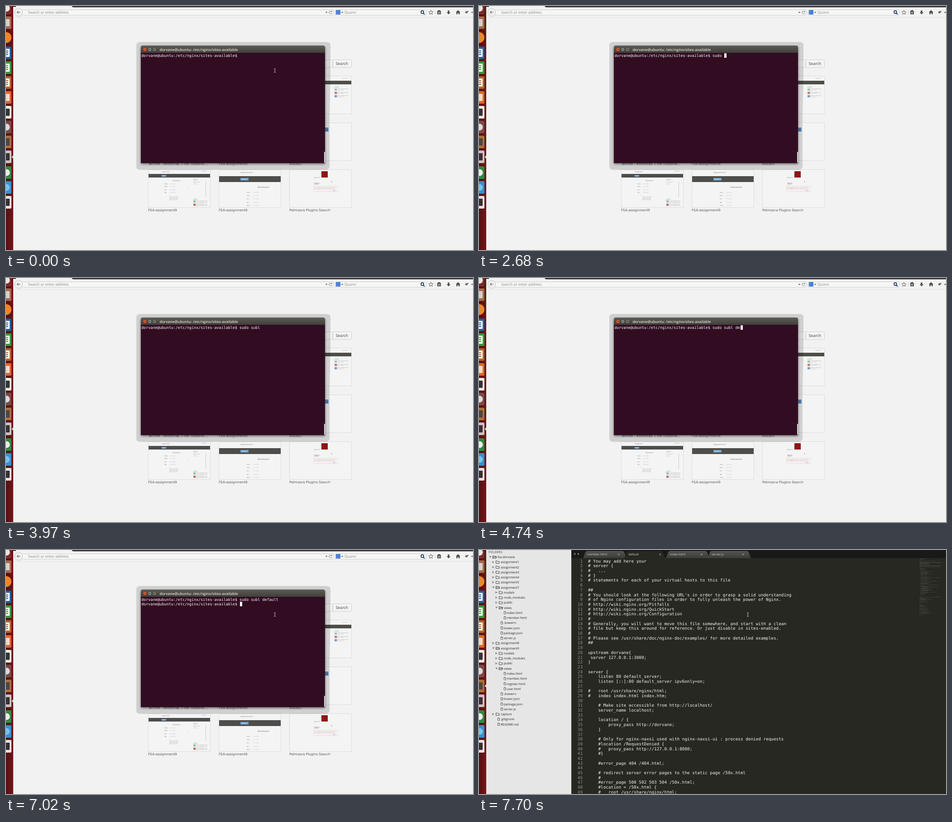
Recreate the animation shown at these times as an HTML page. Size 1032 by 542 pixels, loop 8000 ms.

```html
<!DOCTYPE html>
<html lang="en">
<head>
<meta charset="utf-8">
<title>Opening a config file</title>
<style>
  html, body { margin: 0; width: 100%; height: 100%; overflow: hidden; background: #f2f2f2; }
  svg { display: block; }
  text { font-family: "Open Sans", "Noto Sans", sans-serif; white-space: pre; text-rendering: geometricPrecision; }
  .mono { font-family: "DejaVu Sans Mono", monospace; }
  .wide { font-family: "DejaVu Sans", sans-serif; }
  .semi { font-weight: 600; }
  .bold { font-weight: 700; }
</style>
</head>
<body>
<svg id="stage" width="1032" height="542" viewBox="0 0 1032 542">
  <defs>
    <linearGradient id="dock"><stop offset="0" stop-color="#561013"/><stop offset=".8" stop-color="#6d1417"/><stop offset="1" stop-color="#7e1c1e"/></linearGradient>
    <linearGradient id="title" x2="0" y2="1"><stop offset="0" stop-color="#5d5b55"/><stop offset="1" stop-color="#403f3a"/></linearGradient>
    <linearGradient id="tab" x2="0" y2="1"><stop offset="0" stop-color="#53544f"/><stop offset="1" stop-color="#3b3c37"/></linearGradient>
    <filter id="shadow" x="-10%" y="-10%" width="120%" height="125%"><feDropShadow dx="0" dy="2" stdDeviation="2.5" flood-opacity=".55"/></filter>
  </defs>
  <g id="browser"></g>
  <g id="editor"></g>
  <g id="launcher"></g>
  <g id="pointer" fill="none" stroke="#e4dfe2" stroke-width=".9"><path d="M592.3 139.5h1.2l.6.6.6-.6h1.2M594.1 140v7M592.3 147.5h1.2l.6-.6.6.6h1.2"/></g>
</svg>
<script>
const LOOP = 8000;
const USER = 'dorvane';
const PROMPT = USER + '@ubuntu:/etc/nginx/sites-available$ ';
const COMMAND = 'sudo subl default';
const CELL = 5.057;

const $ = id => document.getElementById(id);
const rect = (x, y, w, h, fill, more = '') => `<rect x="${x}" y="${y}" width="${w}" height="${h}" fill="${fill}" ${more}/>`;
const disc = (x, y, r, fill, more = '') => `<circle cx="${x}" cy="${y}" r="${r}" fill="${fill}" ${more}/>`;
const path = (d, fill, more = '') => `<path d="${d}" fill="${fill}" ${more}/>`;
const line = (d, color, width = 1) => path(d, 'none', `stroke="${color}" stroke-width="${width}"`);
const text = (x, y, s, size, fill, more = '') => `<text x="${x}" y="${y}" font-size="${size}" fill="${fill}" ${more}>${s}</text>`;
const tiny = (x, y, s, fill = '#888', size = 2.6) => text(x, y, s, size, fill);
const box = (x, y, w, h, fill, stroke, r = 0) => rect(x + .5, y + .5, w - 1, h - 1, fill, `stroke="${stroke}" rx="${r}"`);

// ---- Browser ----
function toolbar() {
  const ink = '#4a4a4a';
  return rect(16, 0, 1016, 542, '#f2f2f2') +
    path('M145 0H1032V3H150Q146 3 145 0Z', '#3c3b37') + rect(16, 0, 6, 2, '#3c3b37') +
    rect(16, 25, 1016, 1, '#e2e1e0') +
    box(34, 8, 690, 13, '#f6f6f6', '#cfcecd', 2) +
    disc(28, 14, 8.5, '#f4f4f4', 'stroke="#bcbbba"') +
    line('M32 14H24.5M28 10.5L24.3 14L28 17.5', '#8b8a89', 1.5) +
    text(49, 17.3, 'Search or enter address', 8.05, '#858585') +
    path('M705.5 13h5l-2.5 3z', '#666') +
    line('M719.4 12.6A3 3 0 1 0 719.8 15', '#777') + path('M717.5 13.4h3v-3z', '#777') +
    box(727, 8, 202, 13, '#f6f6f6', '#cfcecd', 2) +
    rect(729, 9, 10, 10, '#4b80d6') + path('M740.5 13h5l-2.5 3z', '#666') +
    text(748, 17.3, 'Quorvi', 8.05, '#858585') +
    disc(920, 13.5, 3, 'none', 'stroke="#25406f" stroke-width="1.8"') + line('M922 15.7L925 18.7', '#25406f', 2) +
    path('M939 9.5l1.4 3.1 3.3.3-2.5 2.3.8 3.3-3-1.8-3 1.8.8-3.3-2.5-2.3 3.3-.3z', 'none', `stroke="${ink}" stroke-width=".9"`) +
    rect(948, 10, 1, 9, '#d4d3d2') +
    rect(953, 10.5, 8, 8, ink, 'rx="1"') + rect(955, 9.3, 4, 2, ink) + line('M954.5 13.5h5M954.5 16h5M957 13v4', '#eee', .8) +
    path('M976.3 10h3.4v4h2.5l-4.2 4.5-4.2-4.5h2.5z', ink) +
    path('M999 9.3l5 4.7h-1.4v4.4h-2.4v-3h-2.4v3h-2.4V14H994z', ink) +
    path('M1015 12.5l7-2-1 3-3 3-3-1z', '#666') + path('M1027.500 13h5l-2.500 3z', '#666');
}

function posts(x, y, step) {
  return ['#8fc7b0', '#c06a62', '#6b8fc0'].map((c, i) => {
    const top = y + i * step;
    return rect(x, top, 5.5, 5, c, 'opacity=".85"') + tiny(x + 6.5, top + 2.1, 'Short headline here') + tiny(x + 6.5, top + 4.6, 'Read more', '#aaa');
  }).join('');
}

function fields(x, y, step, gap, names) {
  return names.map((n, i) => tiny(x, y + i * step, n, '#555') + tiny(x + gap, y + i * step, 'Your value', '#aaa')).join('');
}

function page() {
  const cols = [314, 470, 626], rows = [155, 259, 363];
  const caption = (x, y, s) => text(x, y, s, 7.35, '#555', 'class="wide"');
  let out = box(560, 119, 162, 18, '#f5f5f5', '#d5d5d5') + box(722, 119, 42, 18, '#f4f4f4', '#d0d0d0', 1) +
    text(728.5, 131.2, 'Search', 8.8, '#3a3a3a');
  for (const y of rows) for (const x of cols) out += box(x, y, 138, 85, '#f4f4f4', '#dcdcdc');
  out += rect(627, 166, 136, 8, '#4d4d4a') + tiny(743, 162, 'Home') + tiny(751, 162, 'Out') +
    tiny(726, 180.500, 'RECENT', '#666') + posts(726, 183, 7.5) +
    rect(700, 270, 12.500, 9, '#5b8fc9') + tiny(706, 276, 'Add', '#234');
  out += caption(314, 352.600, 'Tarvine - Bootstrap 3 flat corporat...') + caption(470, 352.600, 'FSA-assignment9') + caption(626, 352.600, 'ADDED');

  out += tiny(344, 368.600, 'Assignment', '#667', 3.2) + tiny(432, 368, 'Home') + tiny(438.500, 368, 'Out') +
    rect(315, 373, 136, 8, '#4d4d4a') + rect(344, 375.500, 10, 3.500, '#78a6d2') + tiny(345, 378, 'Register', '#fff', 2) +
    tiny(368, 389, 'REGISTRATION', '#555', 2.500) + fields(350, 396, 6.300, 12, ['Name', 'Email', 'City', 'Age']) +
    tiny(401, 405, 'ok', '#aaa') + tiny(414, 387.300, 'SEARCH', '#666') + tiny(414, 392, 'Type a word') + tiny(414, 396, 'Results', '#aaa') +
    tiny(361, 425, 'Terms and notes') + tiny(361, 428, 'Read these first') + tiny(361, 431, 'before sending') +
    rect(441, 390, 1, 34, '#ccc') + tiny(414, 429.500, 'RECENT', '#666') + rect(414, 431.500, 5.500, 5, '#8fc7b0') +
    rect(414, 439, 5.500, 5, '#b87b73') + [434, 436.500, 441, 443.500].map(y => tiny(421, y, 'Short headline here')).join('');

  out += tiny(518, 371.300, 'Assignment nine', '#5d7286', 3.500) + rect(471, 378, 136, 13, '#4d4d4a') + rect(518, 382, 18, 5.500, '#78a6d2') +
    tiny(521, 386, 'Register', '#fff', 3) + text(556, 403.800, 'REGISTRATION', 3.700, '#555') +
    fields(532, 415, 7.200, 14, ['Name', 'Email', 'City', 'Age', 'Phone']);

  out += rect(697, 367, 14, 14, '#8c1515') + tiny(680, 382, 'plugin list', '#777', 3) +
    text(681, 395.300, 'Search', 3.700, '#444') + line('M681 396.500h10', '#888', .5) + line('M719.500 388.500v3.500', '#666', .7) +
    box(679, 400, 54, 12, '#f5f3f3', '#e5dddd') +
    [403.500, 406.500].map(y => tiny(681, y, 'Find a plugin by its name or by a tag in the list', '#b56a6a', 2.200)).join('') +
    tiny(722, 410.500, 'more', '#a33');
  return out + caption(314, 456, 'FSA-assignment9') + caption(470, 456, 'FSA-assignment9') + caption(626, 456, 'Pelmoora Plugins Search');
}

function terminal() {
  const button = (x, fill, mark) => disc(x, 96.500, 4.200, fill, 'stroke="#33322e" stroke-width=".8"') + line(mark, '#3a3934', .9);
  return path('M296 80H709Q717 80 717 88V150L715 250V356Q714 364 706 364H296Q288 364 288 356V88Q288 80 296 80Z', '#000', 'opacity=".14"') +
    '<g filter="url(#shadow)">' + path('M298 349V93Q298 88 303 88H700Q705 88 705 93V349Z', '#300a24') + '</g>' +
    path('M298 104V93Q298 88 303 88H700Q705 88 705 93V104Z', 'url(#title)') +
    button(307, '#ea5a2c', 'M305.500 95l3 3m0-3l-3 3') + button(317.700, '#85837b', 'M315.700 96.500h4') + button(328.200, '#85837b', 'M326.700 95h3v3h-3z') +
    text(339.500, 99.800, USER + '@ubuntu: /etc/nginx/sites-available', 8.200, '#e3dfd6', 'class="semi"') +
    rect(703, 324, 2, 24, '#dedad7') +
    text(299.200, 113, '', 8.400, '#fff', 'class="mono" id="row1"') +
    text(299.200, 123, PROMPT, 8.400, '#fff', 'class="mono" id="row2"') +
    rect(0, 0, 5, 10, '#fff', 'id="caret"');
}

// ---- Editor ----
const CODE = `# You may add here your
# server {
#   ...
# }
# statements for each of your virtual hosts to this file

##
# You should look at the following URL's in order to grasp a solid understanding
# of Nginx configuration files in order to fully unleash the power of Nginx.
# http://wiki.nginx.org/Pitfalls
# http://wiki.nginx.org/QuickStart
# http://wiki.nginx.org/Configuration
#
# Generally, you will want to move this file somewhere, and start with a clean
# file but keep this around for reference. Or just disable in sites-enabled.
#
# Please see /usr/share/doc/nginx-doc/examples/ for more detailed examples.
##

upstream ${USER}{
 server 127.0.0.1:3000;
}

server {
    listen 80 default_server;
    listen [::]:80 default_server ipv6only=on;

#   root /usr/share/nginx/html;
#   index index.html index.htm;

    # Make site accessible from http://localhost/
    server_name localhost;

    location / {
        proxy_pass http://${USER};
    }

    # Only for nginx-naxsi used with nginx-naxsi-ui : process denied requests
    #location /RequestDenied {
    #   proxy_pass http://127.0.0.1:8080;
    #}

    #error_page 404 /404.html;

    # redirect server error pages to the static page /50x.html
    #
    #error_page 500 502 503 504 /50x.html;
    #location = /50x.html {
    #   root /usr/share/nginx/html;
    #}

    # pass the PHP scripts to FastCGI server listening on 127.0.0.1:9000
    #
    #location ~ \\.php$ {
    #   fastcgi_split_path_info ^(.+\\.php)(/.+)$;
    #   # NOTE: You should have "cgi.fix_pathinfo = 0;" in php.ini
    #
    #   # With php5-cgi alone:
    #   fastcgi_pass 127.0.0.1:9000;
    #   # With php5-fpm:
    #   fastcgi_pass unix:/var/run/php5-fpm.sock;
    #   fastcgi_index index.php;
    #   include fastcgi_params;
    #}

    # deny access to .htaccess files, if the document root
    # concurs with nginx's one
    #
    #location ~ /\\.ht {
    #   deny all;
    #}
}


# another virtual host using mix of IP-, name-, and port-based configuration
#
#server {
#   listen 8000;
#   listen somename:8080;
#   server_name somename alias another.alias;
#   root html;
#   index index.html index.htm;
#
#   location / {
#       try_files $uri $uri/ =404;
#   }
#}


# HTTPS server
#
#server {
#   listen 443;
#   server_name localhost;
#
#   root html;
#   index index.html index.htm;
#
#   ssl on;
#   ssl_certificate cert.pem;
#   ssl_certificate_key cert.key;
#
#   ssl_session_timeout 5m;
#
#   ssl_protocols SSLv3 TLSv1 TLSv1.1 TLSv1.2;
#   ssl_prefer_server_ciphers on;
#
#   location / {
#       try_files $uri $uri/ =404;
#   }
#}`.split('\n');

// Indent gives depth; "+" is a closed folder, "-" an open one.
const TREE = `-fsa-${USER}
 +assignment1
 +assignment2
 +assignment3
 +assignment4
 +assignment5
 -assignment7
  +models
  +node_modules
  +public
  -views
   index.html
   member.html
  .bowerrc
  bower.json
  package.json
  server.js
 +assignment8
 -assignment9
  +models
  +node_modules
  +public
  -views
   index.html
   member.html
   register.html
   user.html
  .bowerrc
  bower.json
  package.json
  server.js
 +capture
 .gitignore
 README.md`.split('\n');

function sidebar() {
  let out = rect(16, 0, 188, 542, '#e6e6e6') + text(21, 6.800, 'FOLDERS', 6.900, '#7c7c7c', 'class="bold"');
  TREE.forEach((row, i) => {
    const depth = row.search(/\S/), name = row.trim().replace(/^[+-]/, '');
    const x = 41 + depth * 6.900, y = 15.500 + i * 11.260, kind = row[depth];
    if (kind === '+' || kind === '-') {
      out += kind === '+' ? path(`M${x - 18.500} ${y - 2.600}l4.500 2.600-4.500 2.600z`, '#8a8a8a') : path(`M${x - 18.700} ${y - 2}h5.200l-2.600 4.200z`, '#8a8a8a');
      out += line(`M${x - 10.500} ${y + 2.800}v-5.300h2.800l1 1.100h3.500v4.200z`, '#333', .9);
      if (kind === '-') out += line(`M${x - 10.500} ${y + 2.800}l2-3h6.300l-1.500 3`, '#333', .8);
    } else {
      out += line(`M${x - 6.500} ${y - 2.900}h2.700l1.500 1.500v4.200h-4.200zM${x - 4} ${y - 2.900}v1.700h1.700`, '#444', .8);
    }
    out += text(x, y + 2.500, name, 6.850, '#222');
  });
  return out;
}

function tab(x, name, fill, id) {
  return `<g ${id ? `id="${id}"` : ''}>` + path(`M${x} 18.500C${x + 5} 18 ${x + 4} 2.500 ${x + 10} 2.500H${x + 88}C${x + 94} 2.500 ${x + 93} 18 ${x + 98} 18.500Z`, fill, 'stroke="#6a6b65" stroke-width=".5"') +
    label(x, name) + '</g>';
}

function label(x, name) {
  return text(x + 10, 12, name, 6.850, '#d2d2cc') + line(`M${x + 78} 8.200l3.400 3.400m0-3.400l-3.400 3.400`, '#b4b4ae', 1);
}

function editor() {
  const pitch = 10.690;
  const row = (s, i) => text(241, 27.700 + i * pitch, s, 9.345, '#f4f4ee', 'class="mono"');
  const number = (s, i) => text(229, 27.700 + i * pitch, i + 1, 9.345, '#8f908a', 'class="mono" text-anchor="end"');
  return rect(204, 0, 828, 542, '#272822') + rect(204, 0, 828, 18, '#191a17') + sidebar() +
    path('M213 6.200v5l-4-2.500z', '#85867f') + path('M218 6.200v5l4-2.500z', '#85867f') +
    tab(229, 'member.html', 'url(#tab)') +
    '<g id="moved">' + tab(504, 'server.js', 'url(#tab)') + tab(412, 'index.html', 'url(#tab)') + '</g>' +
    path('M319 19C324 18 324 2.500 330 2.500H403C409 2.500 408 18 414 19Z', '#272822', 'id="active"') +
    '<g id="activeLabel">' + label(320.500, 'default') + '</g>' +
    rect(204, 18, 828, 2, '#272822') +
    CODE.slice(0, 49).map(number).join('') +
    '<g id="code">' + CODE.map(row).join('') + '</g>' +
    '<use href="#code" opacity=".7" transform="translate(974 19) scale(.107) translate(-241 -19)"/>' +
    rect(240, 19, 1, 11, '#f8f8f0', 'id="bar"');
}

// ---- Launcher: centre y, tile colour, mark, mark colour ----
const ICONS = [
  [5, '#7c2c2b', 'disc', '#ebe5e0'], [37, '#a4684a', 'square', '#d5d0c9'], [70, '#6d1417', 'ball', '#e8872c'],
  [104, '#1e639b', 'page', '#fff'], [137, '#379a3c', 'page', '#fff'], [170, '#b4632f', 'page', '#fff'],
  [203, '#e2622b', 'square', '#f3d9ca'], [236, '#efebe6', 'square', '#333'], [269, '#7b4a48', 'disc', '#dedbd8'],
  [302, '#a9713a', 'square', '#4a4744'], [335, '#c9c3bf', 'square', '#3a3036'], [370, '#2f8c40', 'disc', '#eee'],
  [403, '#3692c9', 'disc', '#7cc4ea'], [436, '#e6e3e0', 'square', '#35302f']
];

function launcher() {
  const marks = {
    disc: (y, c) => disc(1, y, 7.500, c),
    ball: (y, c) => disc(0, y, 12, c),
    square: (y, c) => rect(-8, y - 8, 16, 16, c, 'rx="1"'),
    page: (y, c, tile) => rect(-8, y - 9, 16, 18, c) + line(`M-4 ${y - 4}h9M-4 ${y}h9M-4 ${y + 4}h9`, tile, 1.800)
  };
  return rect(0, 0, 16, 542, 'url(#dock)') +
    ICONS.map(([y, tile, mark, c]) => rect(-18, y - 14.500, 30.500, 29, tile, 'rx="3" stroke="#3d0a0c" stroke-width=".8"') + marks[mark](y, c, tile)).join('') +
    path('M16 -3.500v7l-3.500-3.500z', '#e8e2e0', 'id="focus"');
}

$('browser').innerHTML = toolbar() + page() + terminal();
$('editor').innerHTML = editor();
$('launcher').innerHTML = launcher();

// ---- Timeline: [time, value], each value held until the next ----
const TYPED = [[0, 0], [1310, 2], [1710, 3], [2280, 4], [2680, 5], [2830, 6], [2980, 7], [3100, 8], [3380, 9],
  [4240, 10], [4620, 11], [4740, 12], [5010, 13], [5160, 14], [5750, 15], [6180, 16], [6460, 17]];
const CARET = [[0, 0], [560, 1], [1160, 0], [1310, 1], [3970, 0], [4240, 1]];
const BAR = [[0, 1], [7420, .6], [7550, .25], [7700, 0]];
const LABEL = [[0, 0], [7280, .35], [7420, .75], [7550, 1]];
const at = (track, t) => track.findLast(([time]) => time <= t)[1];
const show = (id, on) => $(id).setAttribute('visibility', on ? 'inherit' : 'hidden');
const set = (id, name, value) => $(id).setAttribute(name, value);

function draw(t) {
  const editing = t >= 7160, done = t >= 7020, typed = at(TYPED, t);
  $('browser').style.display = editing ? 'none' : '';
  $('editor').style.display = editing ? '' : 'none';
  show('pointer', t < 1160 || done);
  set('focus', 'transform', `translate(0 ${editing ? 302 : 335.500})`);

  $('row1').textContent = PROMPT + COMMAND.slice(0, typed);
  show('row2', done);
  show('caret', at(CARET, t));
  set('caret', 'x', Math.round(517 + (done ? 0 : typed) * CELL));
  set('caret', 'y', done ? 115 : 105);

  set('moved', 'transform', `translate(${t < 7280 ? -14 : 0} 0)`);
  set('active', 'transform', `translate(${t < 7280 ? -14 : 0} 0)`);
  set('activeLabel', 'opacity', at(LABEL, t));
  set('bar', 'opacity', at(BAR, t));
}

const start = performance.now();
function tick() {
  draw((performance.now() - start) % LOOP);
  requestAnimationFrame(tick);
}
tick();
</script>
</body>
</html>
```
